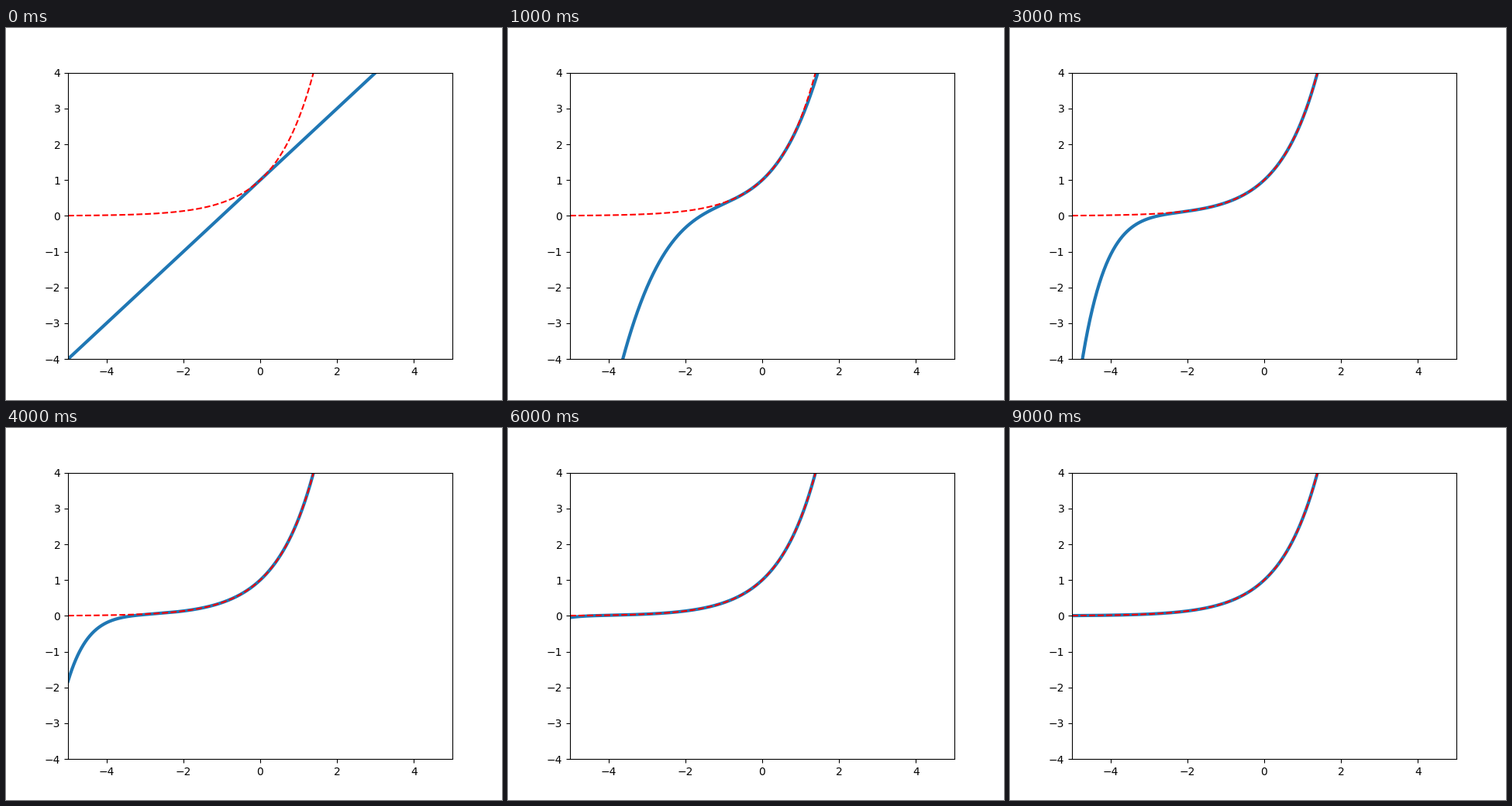
Write a matplotlib script that moves like this. It is 640 by 480 pixels and loops after 10000 ms.

```python
import math

import matplotlib.pyplot as plt
import numpy as np
from matplotlib.animation import FuncAnimation

DEGREES = 20
STEP_MS = 500

x = np.linspace(-5, 5, 1000)


def taylor_exp(x, degree):
    """Partial sum of the exponential series up to the given degree."""
    return sum(x**k / math.factorial(k) for k in range(degree + 1))


fig, ax = plt.subplots(figsize=(6.4, 4.8), dpi=100)
ax.set_xlim(-5, 5)
ax.set_ylim(-4, 4)
approx, = ax.plot(x, taylor_exp(x, 1), color="tab:blue", lw=3)
ax.plot(x, np.exp(x), "r--", lw=1.5)


def update(i):
    approx.set_ydata(taylor_exp(x, i + 1))
    return approx,


anim = FuncAnimation(fig, update, frames=DEGREES, interval=STEP_MS,
                     repeat=True, repeat_delay=0)
plt.show()
```
